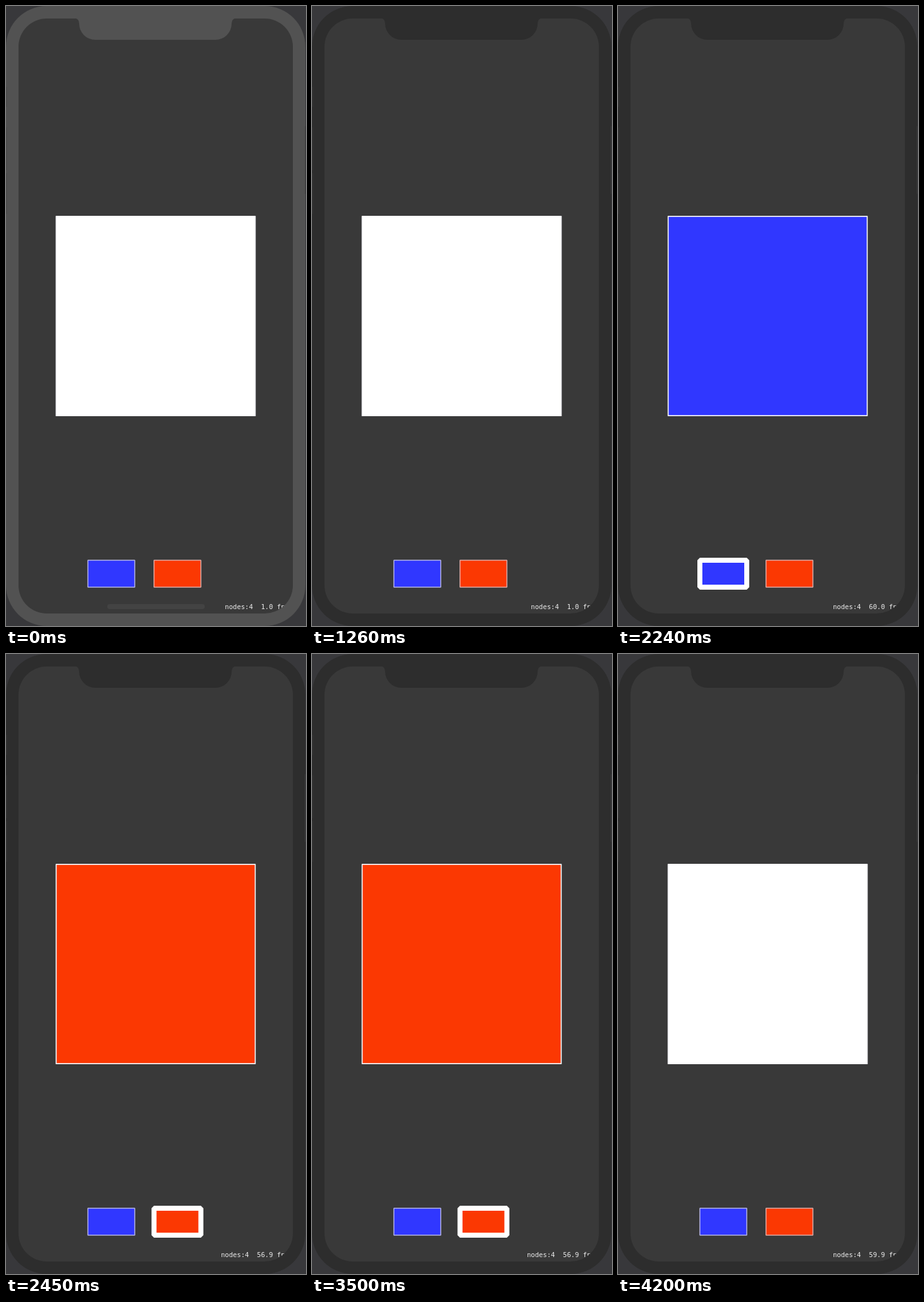
Animation of 480x990 px, one loop 4270 ms. Source, as an HTML page:

```html
<!DOCTYPE html>
<html lang="en">
<head>
<meta charset="utf-8">
<title>Color picker</title>
<style>
html, body { margin: 0; width: 100%; height: 100%; overflow: hidden; background: #38383b; }
svg { display: block; width: 100%; height: 100%; }
text { font: 10.65px "DejaVu Sans Mono", monospace; white-space: pre; }
</style>
</head>
<body>
<svg viewBox="0 0 480 990">
  <defs>
    <clipPath id="screen"><rect x="20" y="20" width="439" height="950" rx="45"/></clipPath>
  </defs>
  <rect width="480" height="990" fill="#38383b"/>
  <rect id="body" x="0" y="0" width="479" height="990" rx="65"/>
  <path id="keys" d="M1 129V161M1 194V262M1 267V332M478.5 192V300" fill="none"/>
  <g clip-path="url(#screen)">
    <rect width="480" height="990" fill="#393939"/>
    <rect id="home" x="162" y="955" width="156" height="8" rx="4" fill="#434343"/>
    <path id="trace" d="M164 958.5H313" stroke="#4a4a4a"/>
    <text id="stats" x="452.8" y="963.3" text-anchor="end" fill="#ececec"></text>
  </g>
  <path id="notch" d="M109 19Q117 20 117 28A26 26 0 0 0 143 54H335A26 26 0 0 0 361 28Q361 20 369 19Z"/>
  <rect id="square" x="80.3" y="335.8" width="318.4" height="318.4" stroke="#f4f4f8" stroke-width="1.7" stroke-linejoin="round"/>
  <rect id="blue" x="131" y="885" width="75" height="43" fill="#3037ff" stroke-linejoin="bevel"/>
  <rect id="red" x="236.8" y="885" width="75" height="43" fill="#fb3802" stroke-linejoin="bevel"/>
</svg>
<script>
const LOOP = 4270;
const FOCUS = 1190, PICK_BLUE = 1330, RATE = 2240, PICK_RED = 2450, CLEAR = 3850;
const BLUE = "#3037ff", RED = "#fb3802";
const el = id => document.getElementById(id);

function set(id, attrs) {
  for (const key in attrs) el(id).setAttribute(key, attrs[key]);
}

function button(id, on, edge) {
  set(id, { stroke: on ? "#fff" : edge, "stroke-width": on ? 8 : 1.5 });
}

function draw(t) {
  const focused = t >= FOCUS;
  const blueOn = t >= PICK_BLUE && t < PICK_RED;
  const redOn = t >= PICK_RED && t < CLEAR;
  const shell = focused ? "#2d2d2d" : "#525252";

  set("body", { fill: shell });
  set("notch", { fill: shell });
  set("keys", { stroke: focused ? "#383838" : "#484848" });
  set("home", { opacity: Math.max(0, 1 - t / 800) });
  set("trace", { opacity: t > 500 && !focused ? 0.8 : 0 });

  set("square", { fill: blueOn ? BLUE : redOn ? RED : "#fff" });
  button("blue", blueOn, "#b4b4e6");
  button("red", redOn, "#e0a9a4");

  const fps = t < RATE ? "1.0" : t < PICK_RED ? "60.0" : t < CLEAR ? "56.9" : "59.9";
  el("stats").textContent = `nodes:4\u00a0\u00a0${fps}\u00a0fps`;
}

function tick() {
  draw(performance.now() % LOOP);
  requestAnimationFrame(tick);
}
tick();
</script>
</body>
</html>
```
